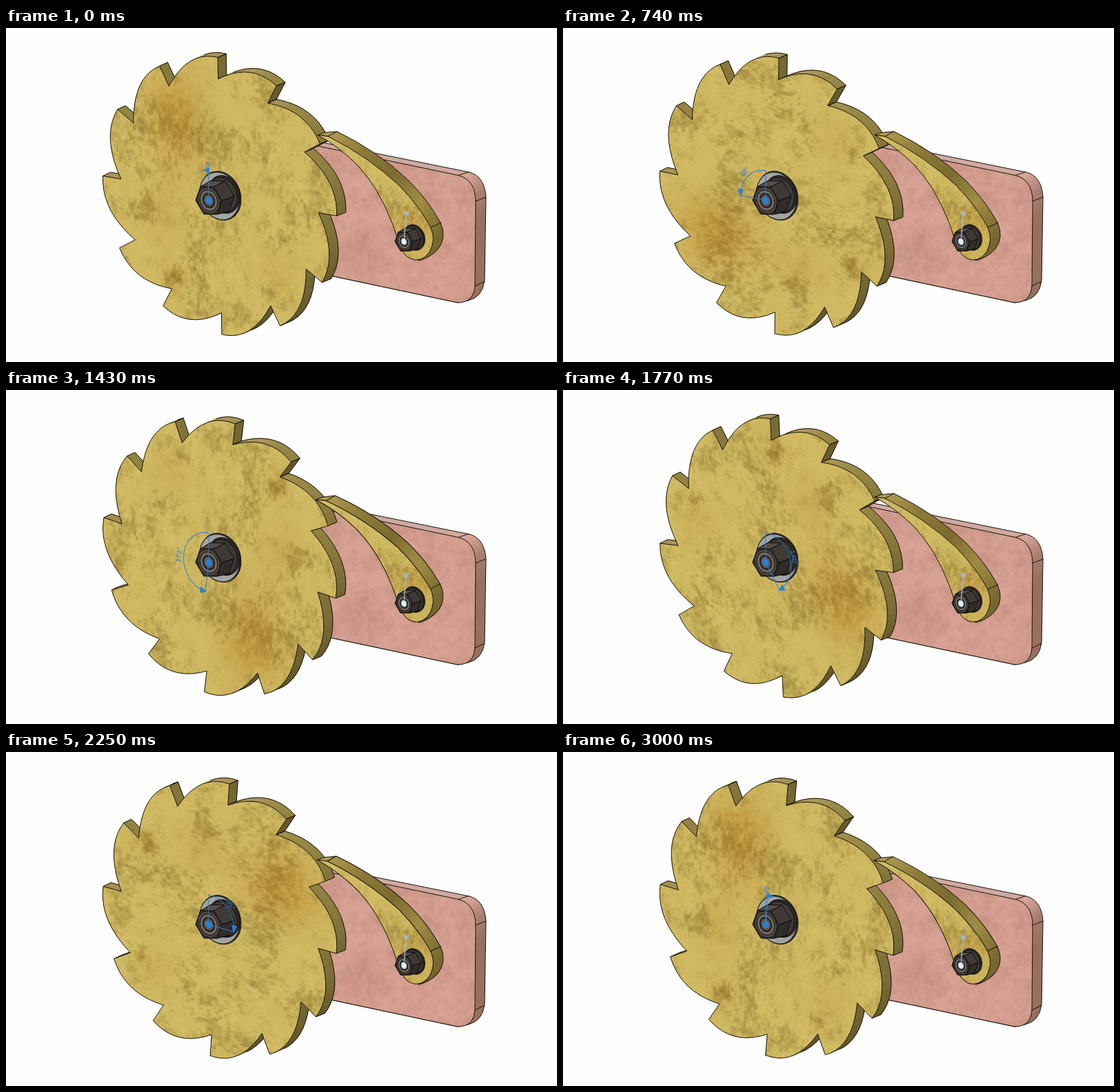
Write an HTML page with a canvas that moves like this. It is 799 px wide and 484 px high and loops after 3.05 s.

```html
<!DOCTYPE html>
<html lang="en">
<head>
<meta charset="utf-8">
<title>Ratchet and pawl</title>
<style>
html, body { margin: 0; width: 100%; height: 100%; overflow: hidden; background: #fefefe; }
canvas { display: block; }
</style>
</head>
<body>
<canvas id="stage" width="799" height="484"></canvas>
<script>
const ctx = document.getElementById('stage').getContext('2d');
const LOOP = 3050, TEETH = 12, RAD = Math.PI / 180;
const INK = '#15130c', BLUE = '#2b80d2';
const HUB = [310, 243.3], HUB_NUT = [294, 250];
const PIVOT = [592, 305], PIVOT_NUT = [577, 309.5];

// [step, start ms]: steps between two entries are evenly spaced
const PACE = [[0, 0], [1, 60], [8, 540], [9, 610], [11, 740], [12, 810], [16, 1100], [17, 1160],
  [24, 1630], [25, 1700], [26, 1770], [27, 1840], [32, 2180], [33, 2250], [34, 2320],
  [39, 2660], [40, 2740], [41, 2790], [44, 3000], [45, 3050]];
// [ms, degrees turned]
const TURN = [[0, 0.3], [740, 88.3], [1100, 132.2], [1770, 212.5], [2250, 264.6],
  [2660, 318], [3000, 353.8], [3050, 360.3]];

function lerpTable(table, v) {
  let i = 1;
  while (i < table.length - 1 && v > table[i][0]) i++;
  const [x0, y0] = table[i - 1], [x1, y1] = table[i];
  return y0 + (y1 - y0) * (v - x0) / (x1 - x0);
}
const starts = Array.from({ length: 45 }, (_, i) => Math.round(lerpTable(PACE, i) / 10) * 10);

const mix = (a, b, k) => a.map((v, i) => v + (b[i] - v) * k);
const css = c => `rgb(${c.map(Math.round).join(',')})`;
const clamp = v => Math.max(0, Math.min(1, v));
const ramp = (a, b, v) => clamp((v - a) / (b - a));

// tilted plane -> screen
const planeAt = ([x, y]) => [0.85, 0.15, 0.01, 1.005, x, y];
const project = ([cx, cy], x, y) => [cx + 0.85 * x + 0.01 * y, cy + 0.15 * x + 1.005 * y];
const polar = (c, r, deg) => project(c, r * Math.sin(deg * RAD), -r * Math.cos(deg * RAD));

// ---------- surface textures ----------
function hash(x, y) {
  const s = Math.sin(x * 127.1 + y * 311.7) * 43758.5453;
  return s - Math.floor(s);
}
function noise(x, y) {
  const i = Math.floor(x), j = Math.floor(y);
  let u = x - i, v = y - j;
  u *= u * (3 - 2 * u);
  v *= v * (3 - 2 * v);
  const a = hash(i, j), b = hash(i + 1, j), c = hash(i, j + 1), d = hash(i + 1, j + 1);
  return a + (b - a) * u + (c - a) * v + (a - b - c + d) * u * v;
}
function texture(w, h, shade) {
  const cv = document.createElement('canvas');
  cv.width = w;
  cv.height = h;
  const g = cv.getContext('2d'), img = g.createImageData(w, h);
  for (let p = 0; p < w * h; p++) {
    const c = shade(p % w, Math.floor(p / w));
    img.data.set([c[0], c[1], c[2], 255], p * 4);
  }
  g.putImageData(img, 0, 0);
  return cv;
}
function brass(spots) {
  return (px, py) => {
    const x = px - 205, y = py - 205;
    const big = noise(x / 42 + 9, y / 42 + 3), mid = noise(x / 15 + 31, y / 16);
    const small = noise(x / 5 + 70, y / 7), fine = noise(x / 2 + 50, y / 3.5), grain = noise(x / 1.2, y / 1.8);
    const patchy = mid * 0.35 + small * 0.35 + fine * 0.3;
    let rust = 0.3 * ramp(0.6, 0.9, big * 0.6 + small * 0.4);
    for (const [sx, sy, r, k] of spots) {
      rust += k * Math.exp(-((x - sx) ** 2 + ((y - sy) * 0.8) ** 2) / (r * r));
    }
    rust *= 0.2 + 1.3 * patchy;
    const dirt = ramp(0.5, 0.85, big * 0.28 + patchy * 0.6 + grain * 0.12);
    let c = mix([214, 192, 107], [199, 176, 86], mid * 0.4 + grain * 0.6);
    c = mix(c, [181, 130, 44], clamp(rust) * 0.75);
    return mix(c, [128, 112, 50], dirt * 0.6);
  };
}
const wheelSkin = texture(410, 410, brass([[-78, -110, 48, 0.9], [-62, -60, 36, 0.4],
  [-100, 40, 34, 0.4], [95, 102, 28, 0.35], [-82, 132, 16, 0.6]]));
const pawlSkin = texture(200, 200, brass([[-62, -56, 26, 0.8]]));
const plateSkin = texture(290, 250, (x, y) => {
  const m = noise(x / 24, y / 24) * 0.4 + noise(x / 8 + 7, y / 9) * 0.3 + noise(x / 2.5, y / 4) * 0.3;
  return mix([216, 163, 149], [195, 141, 127], ramp(0.3, 0.9, m));
});

// ---------- drawing helpers ----------
function trace(pts, closed = true) {
  ctx.beginPath();
  pts.forEach(([x, y]) => ctx.lineTo(x, y));
  if (closed) ctx.closePath();
}
function line(a, b) {
  trace([a, b], false);
  ctx.stroke();
}
function paint(path, fill) {
  ctx.fillStyle = fill;
  ctx.fill(path);
  ctx.stroke(path);
}
function gradient(x0, y0, x1, y1, ...stops) {
  const g = ctx.createLinearGradient(x0, y0, x1, y1);
  stops.forEach((c, i) => g.addColorStop(i / (stops.length - 1), c));
  return g;
}
function ring(c, r, fill, stroke) {
  ctx.save();
  ctx.transform(...planeAt(c));
  ctx.beginPath();
  ctx.arc(0, 0, r, 0, 7);
  ctx.restore();
  if (fill) { ctx.fillStyle = fill; ctx.fill(); }
  if (stroke) { ctx.strokeStyle = stroke; ctx.stroke(); }
}
function pen(color, width) {
  ctx.strokeStyle = color;
  ctx.lineWidth = width;
  ctx.lineJoin = 'round';
}

// ---------- back plate ----------
const plateBody = new Path2D('M400 154L672 209Q694 215 696 245L694 366Q691 390 670 395L655 398L400 344Z');
const plateFace = new Path2D('M400 160L656 213.5Q681 220 681 252L680 372Q679 398 655 398L400 344Z');
function drawPlate() {
  pen(INK, 1);
  paint(plateBody, gradient(640, 200, 696, 270, '#cfaa9f', '#d6a698', '#ac7e72', '#97705f'));
  ctx.save();
  ctx.clip(plateFace);
  ctx.drawImage(plateSkin, 400, 153);
  ctx.restore();
  ctx.stroke(plateFace);
  line([656, 213.5], [671, 208.5]);
  line([681, 251], [696, 245]);
  line([680, 374], [694, 367]);
}

// ---------- wheel ----------
function outline(turn) {
  const pts = [];
  for (let k = TEETH; k > 0; k--) {
    const a = k * 30 - turn;
    const tip = polar(HUB, 199.5, a), bulge = polar(HUB, 209, a - 14), root = polar(HUB, 168.5, a - 30);
    for (let i = 0; i <= 10; i++) {
      const t = i / 10, s = 1 - t;
      const p = [0, 1].map(n => s * s * tip[n] + 2 * s * t * bulge[n] + t * t * root[n]);
      p.corner = i === 0 || i === 10;
      pts.push(p);
    }
  }
  return pts;
}
const behind = ([x, y]) => [x + 12.2 + (x - 310) * 0.006, y - 5.3];

function sideColor(nx, ny) {
  const c = mix([88, 77, 34], [166, 148, 78], clamp(0.5 - 0.45 * ny - 0.1 * nx));
  return css(mix(c, [196, 160, 138], 0.3 * ramp(0.92, 1, -ny)));
}
function drawWheel(turn) {
  const pts = outline(turn);
  const quads = [];
  pts.forEach((a, i) => {
    const b = pts[(i + 1) % pts.length];
    const dx = b[0] - a[0], dy = b[1] - a[1], len = Math.hypot(dx, dy);
    const n = [-dy / len, dx / len];
    if (n[0] * 12.2 - n[1] * 5.3 > 0) quads.push([a, b, behind(b), behind(a), n]);
  });
  for (const [a, b, c, d, n] of quads) {
    trace([a, b, c, d]);
    ctx.fillStyle = sideColor(...n);
    pen(ctx.fillStyle, 0.8);
    ctx.fill();
    ctx.stroke();
  }
  pen(INK, 1);
  for (const [a, b, c, d] of quads) {
    line(d, c);
    if (a.corner) line(a, d);
    if (b.corner) line(b, c);
  }
  ctx.save();
  trace(pts);
  ctx.clip();
  ctx.transform(...planeAt(HUB));
  ctx.rotate(-turn * RAD);
  ctx.drawImage(wheelSkin, -205, -205);
  ctx.restore();
  trace(pts);
  ctx.stroke();
}

// ---------- pawl ----------
const pawlBody = new Path2D('M452 155L462 151.5L480 150Q540 179 585 222Q613 251 630 282Q640 304 626 321Q615 333 598 337L590 300Q560 225 467 157Z');
const pawlFace = new Path2D('M452 155L467 157Q525 186 571 229Q600 259 616 289Q624 307 614 325Q602 341 586 334C570 326 568 300 558 278Q541 233 510 199Q483 172 452 155Z');
const pawlEdges = new Path2D('M467 157L480 150M616 289L631 282');

// radians the pawl has dropped into the gap behind a passing tooth
function pawlDrop(turn) {
  const u = ((turn + 25) % 30) / 30;
  return u < 0.7 ? 0.09 * (1 - (u / 0.7) ** 1.6) : 0;
}
function drawPawl(turn) {
  const plane = new DOMMatrix(planeAt([0, 0]));
  const m = new DOMMatrix().translate(...PIVOT).multiply(plane)
    .rotate(-pawlDrop(turn) / RAD).multiply(plane.inverse()).translate(-PIVOT[0], -PIVOT[1]);
  ctx.save();
  ctx.transform(m.a, m.b, m.c, m.d, m.e, m.f);
  pen(INK, 1);
  paint(pawlBody, gradient(465, 150, 632, 300, '#b29d55', '#8d7b38', '#7c6b30', '#a08c44', '#77672e'));
  ctx.save();
  ctx.clip(pawlFace);
  ctx.drawImage(pawlSkin, 448, 146);
  ctx.restore();
  ctx.stroke(pawlFace);
  ctx.stroke(pawlEdges);
  ctx.restore();
}

// ---------- nuts ----------
function drawNut(front, s) {
  const along = d => [front[0] + d * s, front[1] - d * 0.4 * s];
  const hex = (c, r) => Array.from({ length: 6 }, (_, i) => polar(c, r * s, i * 60 + 22));
  pen('#0e0d0c', 1);
  ring(along(22), 27 * s, '#2f2c2a', '#0e0d0c');
  ring(along(20), 25 * s, '#3f3a36', '#0e0d0c');
  const f = hex(front, 22.5), b = hex(along(16), 25);
  const tones = ['#3f3a36', '#2f2c29', '#24211f', '#282523', '#3f3a35', '#554d46'];
  for (const i of [3, 4, 2, 5, 1, 0]) {
    const j = (i + 1) % 6;
    trace([f[i], f[j], b[j], b[i]]);
    ctx.fillStyle = tones[i];
    ctx.fill();
    ctx.stroke();
  }
  trace(f);
  ctx.fillStyle = '#3f3a35';
  ctx.fill();
  ctx.stroke();
  ring(front, 19 * s, '#4d4640', '#1a1816');
  ring(front, 15 * s, '#71685f', '#151312');
  ring(front, 12 * s, '#312e2b', '#8d837b');
  ring(front, 9 * s, '#5c554f', '#171514');
}
function drawWasher() {
  pen('#181818', 1.2);
  ring([311.3, 243], 34.8, '#3a3a3a', '#181818');
  ring([309.8, 243.4], 34, '#a3a3a0', '#222');
}

// ---------- angle readouts ----------
function drawReadout(turn) {
  const full = turn % 360;
  const angle = full > 180 ? full - 360 : full;
  const dir = angle < 0 ? 1 : -1, size = Math.abs(angle), R = 43;
  const tip = size < 10 ? 9 : 2;
  ctx.save();
  ctx.transform(...planeAt(HUB_NUT));
  pen(BLUE, 1.1);
  ctx.fillStyle = BLUE;
  ctx.beginPath();
  ctx.moveTo(0, -R);
  ctx.lineTo(0, 0);
  ctx.rotate(dir * size * RAD);
  ctx.lineTo(0, -R);
  ctx.stroke();
  ctx.beginPath();
  ctx.moveTo(dir * tip, -R);
  ctx.lineTo(dir * (tip - 11), -R - 5);
  ctx.lineTo(dir * (tip - 11), -R + 5);
  ctx.fill();
  ctx.rotate(-dir * size * RAD);
  const from = -Math.PI / 2;
  ctx.beginPath();
  ctx.arc(0, 0, R, from, from + dir * size * RAD, dir < 0);
  ctx.stroke();
  ctx.beginPath();
  ctx.arc(0, 0, 5.5, 0, 7);
  ctx.fill();
  ctx.rotate(dir * size / 2 * RAD);
  ctx.font = '11px "Liberation Sans", Arial, sans-serif';
  ctx.textAlign = 'center';
  ctx.fillText(Math.round(size) + '°', 0, -R - 4);
  ctx.restore();
}
function drawPawlReadout(turn) {
  const lean = 4 - pawlDrop(turn) * 30;
  const [x, y] = PIVOT_NUT, top = [x + lean, y - 40];
  pen('#a9b6c4', 0.9);
  line([x, y], top);
  line([x, y], [x + 2, y - 36]);
  ctx.fillStyle = '#a9b6c4';
  trace([[top[0] - 4, top[1] - 4], [top[0] + 5, top[1] - 2], [top[0] - 2, top[1] + 4]]);
  ctx.fill();
  ctx.font = '7px "Liberation Sans", Arial, sans-serif';
  ctx.textAlign = 'center';
  ctx.fillText('1°', top[0] + 1, top[1]);
  ring(PIVOT_NUT, 4.5, '#e4edf2', '#86b4cf');
}

function draw(t) {
  const at = starts.filter(s => s <= t).pop();
  const turn = lerpTable(TURN, at);
  ctx.fillStyle = '#fefefe';
  ctx.fillRect(0, 0, 799, 484);
  drawPlate();
  drawWheel(turn);
  drawPawl(turn);
  drawWasher();
  drawNut(HUB_NUT, 1);
  drawNut(PIVOT_NUT, 0.68);
  drawPawlReadout(turn);
  drawReadout(turn);
}

const begin = performance.now();
function tick() {
  draw((performance.now() - begin) % LOOP);
  requestAnimationFrame(tick);
}
tick();
</script>
</body>
</html>
```
